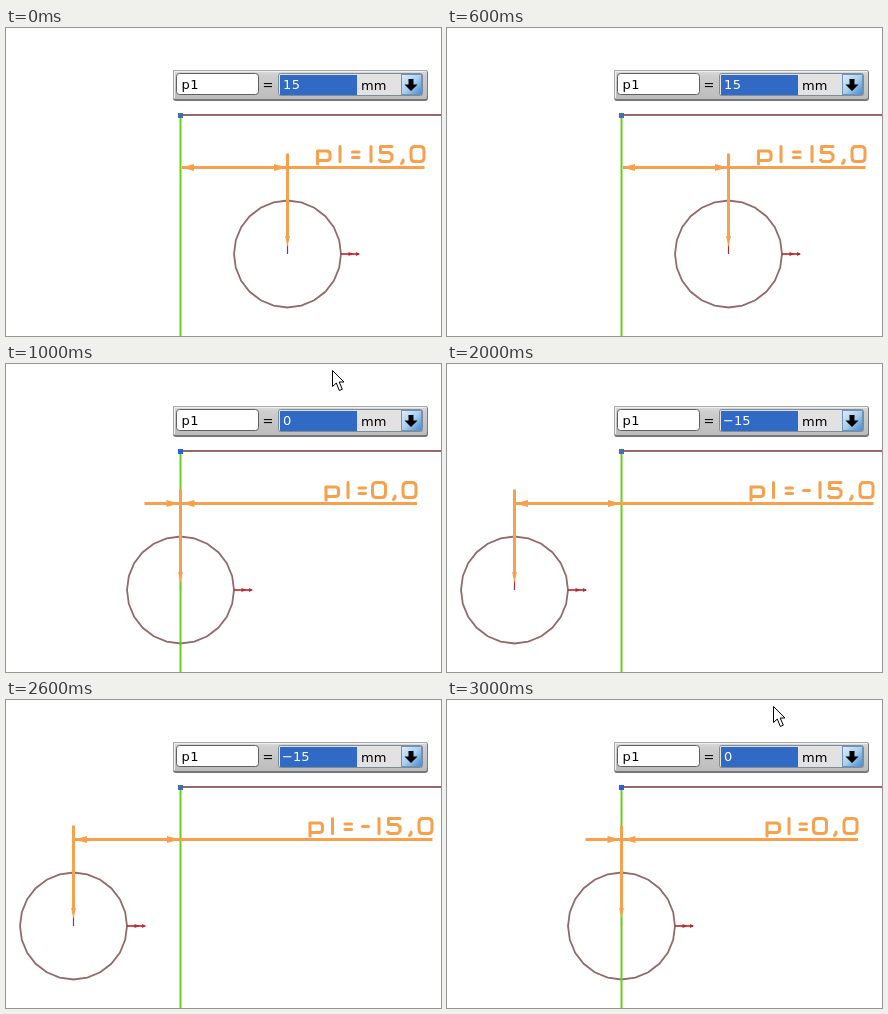
Write an HTML page that moves like this. It is 435 by 308 pixels and loops after 4 s.

```html
<!DOCTYPE html>
<html lang="en">
<head>
<meta charset="utf-8">
<title>Signed dimension</title>
<style>
html, body { margin: 0; width: 100%; height: 100%; overflow: hidden; background: #fff; }
svg { display: block; width: 435px; height: 308px; }
text { font: 13px "DejaVu Sans", Verdana, sans-serif; fill: #000; }
.num { letter-spacing: .6px; }
.sel { fill: #fff; }
.edge { fill: none; stroke: #926a6a; stroke-width: 1.8; }
.dim { fill: none; stroke: #f7a04d; stroke-width: 3; }
.tip { fill: #f7a04d; stroke: none; }
.glyphs { stroke-linecap: round; stroke-linejoin: round; }
.body { animation: shift 4s step-end infinite; }
.plus { animation: plus 4s step-end infinite; }
.zero { animation: zero 4s step-end infinite; }
.minus { animation: minus 4s step-end infinite; }
@keyframes shift {
  0% { transform: translateX(0); }
  25%, 75% { transform: translateX(-107px); }
  50% { transform: translateX(-214px); }
}
@keyframes plus { 0% { visibility: visible; } 25%, 100% { visibility: hidden; } }
@keyframes zero { 0%, 50% { visibility: hidden; } 25%, 75% { visibility: visible; } }
@keyframes minus { 0%, 75% { visibility: hidden; } 50% { visibility: visible; } }
</style>
</head>
<body>
<svg viewBox="0 0 435 308">
  <defs>
    <linearGradient id="panel" x2="0" y2="1">
      <stop offset="0" stop-color="#dedede"/>
      <stop offset=".2" stop-color="#cecece"/>
      <stop offset="1" stop-color="#bcbcbc"/>
    </linearGradient>
    <linearGradient id="button" x2="1" y2="1">
      <stop offset="0" stop-color="#dceefa"/>
      <stop offset=".5" stop-color="#a8d0f0"/>
      <stop offset="1" stop-color="#4288d0"/>
    </linearGradient>
    <path id="left" d="M0 0l13-3.5v7z"/>
    <path id="right" d="M0 0l-13-3.5v7z"/>
    <!-- stroke lettering, baseline at y = 0 -->
    <path id="p" d="M0-10.5V2.500M0-10.500H9Q12.500-10.500 12.500-7.500V-4Q12.500-1 9-1H0"/>
    <path id="one" d="M0-15V0"/>
    <path id="eq" d="M0-9.500H6.500M0-4H6.500"/>
    <path id="dash" d="M0-7H6"/>
    <path id="five" d="M13-15H1.500V-9H10L13-6.500V-2.500L10.500 0H2.500L.5-1.500"/>
    <path id="comma" d="M1-1.500V0L-.5 2"/>
    <path id="nil" d="M4-15H9Q13-15 13-11V-4Q13 0 9 0H4Q0 0 0-4V-11Q0-15 4-15z"/>
  </defs>

  <path class="edge" d="M175 87H435"/>
  <g class="body">
    <path d="M281.500 216V226" stroke="#a03038" stroke-width="1.2"/>
    <polygon id="ring" class="edge"/>
    <path d="M335 226H353" stroke="#b42430" stroke-width="1.6"/>
    <path d="M347.500 226l-5-2v4zM354 226l-4-2v4z" fill="#c0242c"/>
  </g>
  <path d="M174.500 87V308" stroke="#66d018" stroke-width="2"/>

  <g class="body dim">
    <path d="M281.500 125.500V209"/>
    <path class="tip" d="M281.500 219l-2.400-11h4.800z"/>
  </g>
  <rect x="172" y="85" width="5" height="5" fill="#416fb2"/>
  <rect class="zero" x="172" y="85" width="5" height="5" fill="#2c5fdc"/>

  <g class="dim plus">
    <path d="M176 139.500H418.500"/>
    <use class="tip" href="#left" x="175" y="139.500"/>
    <use class="tip" href="#right" x="281" y="139.500"/>
    <g class="glyphs" role="img" aria-label="p1=15,0">
      <use href="#p" x="311.500" y="133.500"/><use href="#one" x="334" y="133.500"/>
      <use href="#eq" x="346.500" y="133.500"/><use href="#one" x="365" y="133.500"/>
      <use href="#five" x="373" y="133.500"/><use href="#comma" x="396" y="133.500"/>
      <use href="#nil" x="405" y="133.500"/>
    </g>
  </g>
  <g class="dim zero">
    <path d="M138.500 139.500H411"/>
    <use class="tip" href="#right" x="173.500" y="139.500"/>
    <use class="tip" href="#left" x="175.500" y="139.500"/>
    <g class="glyphs" role="img" aria-label="p1=0,0">
      <use href="#p" x="320" y="133.500"/><use href="#one" x="342" y="133.500"/>
      <use href="#eq" x="353" y="133.500"/><use href="#nil" x="366.500" y="133.500"/>
      <use href="#comma" x="388" y="133.500"/><use href="#nil" x="397" y="133.500"/>
    </g>
  </g>
  <g class="dim minus">
    <path d="M68 139.500H426.500"/>
    <use class="tip" href="#left" x="68" y="139.500"/>
    <use class="tip" href="#right" x="174" y="139.500"/>
    <g class="glyphs" role="img" aria-label="p1=-15,0">
      <use href="#p" x="304" y="133.500"/><use href="#one" x="326.500" y="133.500"/>
      <use href="#eq" x="339" y="133.500"/><use href="#dash" x="356.500" y="133.500"/>
      <use href="#one" x="373" y="133.500"/><use href="#five" x="381" y="133.500"/>
      <use href="#comma" x="404" y="133.500"/><use href="#nil" x="413" y="133.500"/>
    </g>
  </g>

  <!-- value editor -->
  <rect x="167" y="42" width="255" height="31" rx="3" fill="#777"/>
  <rect x="167" y="42" width="254" height="29" rx="2" fill="url(#panel)"/>
  <path d="M167.500 71V42.500H421" fill="none" stroke="#a8a8a8"/>
  <path d="M168.500 70V43.500H420" fill="none" stroke="#eee"/>
  <rect x="170.500" y="45.500" width="82" height="21" rx="3" fill="#fff" stroke="#606060"/>
  <text class="num" x="175.500" y="61">p1</text>
  <text x="256.500" y="61">=</text>
  <rect x="272.500" y="45.500" width="144" height="22" rx="2" fill="#e2e2e2" stroke="#7c8c9c"/>
  <rect x="274" y="47" width="77" height="20" fill="#316ac5"/>
  <text class="num sel plus" x="277" y="61">15</text>
  <text class="num sel zero" x="277" y="61">0</text>
  <text class="sel minus" x="276" y="61">−15</text>
  <text x="355" y="62">mm</text>
  <rect x="395.500" y="46.500" width="20" height="20" fill="url(#button)" stroke="#6f94b4"/>
  <path d="M402.500 51h5v5.500h4l-6.500 6.500-6.500-6.500h4z" fill="#000"/>

  <path class="zero" d="M326.500 6.500V22.500L330.300 19L333.300 26.500L336.300 25.200L333.200 18H338z" fill="#fff" stroke="#000"/>
</svg>
<script>
const sides = 24, radius = 53.5;
const corner = (_, i) => {
  const a = i * 2 * Math.PI / sides;
  return `${281.5 + radius * Math.cos(a)},${226 + radius * Math.sin(a)}`;
};
document.getElementById("ring").setAttribute("points", Array.from({ length: sides }, corner).join(" "));
</script>
</body>
</html>
```
